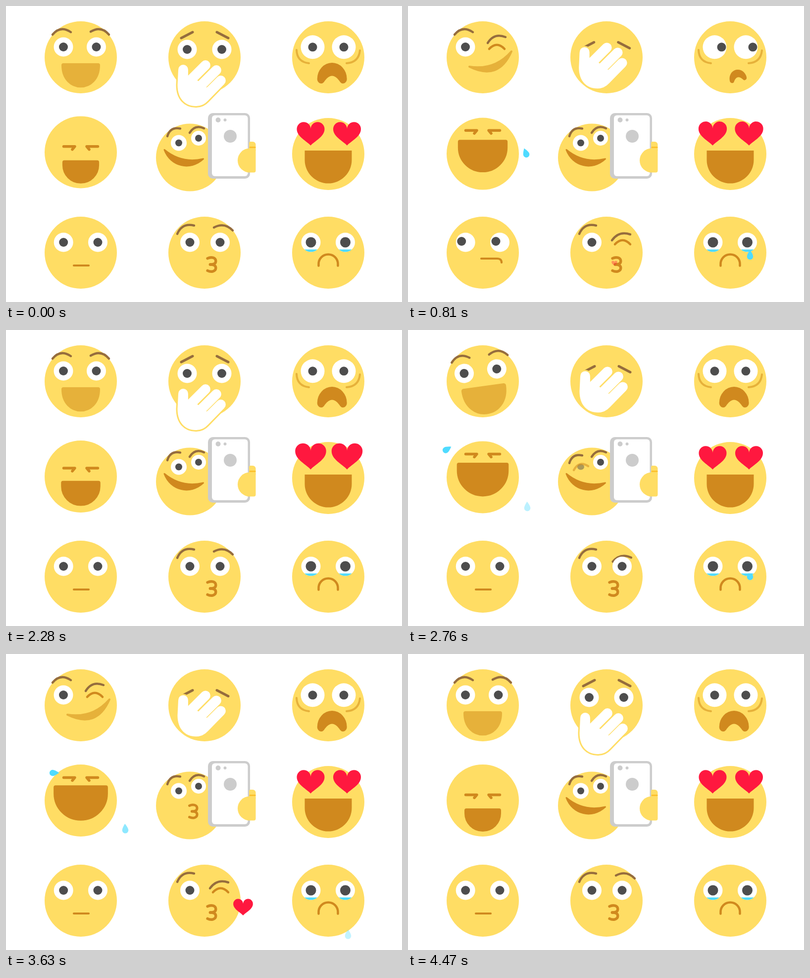
An HTML page with a canvas for the animation above (4.5 s loop, 800 by 600 pixels).

```html
<!DOCTYPE html>
<html lang="en">
<head>
<meta charset="utf-8">
<title>Emoji faces</title>
<style>
  html, body { margin: 0; overflow: hidden; background: #fff; }
  canvas { display: block; }
</style>
</head>
<body>
<canvas width="800" height="600"></canvas>
<script>
const ctx = document.querySelector('canvas').getContext('2d');
const YELLOW = '#ffdd64', BROWN = '#d0891e', GOLD = '#e6b13a', BROW = '#966d3d', RED = '#ff183f',
      DARK = '#4d4d4d', BLUE = '#4fdbff', GREY = '#ccc', ORANGE = '#fcc12f', WHITE = '#fff';
const HEART = 'M0,0C-8,-9 -28,-18 -28,-33A14,14 0 0 1 0,-34A14,14 0 0 1 28,-33C28,-18 8,-9 0,0Z';
const DROP = 'M0,-10Q6.3,-1 6.3,3.2A6.3,6.3 0 0 1 -6.3,3.2Q-6.3,-1 0,-10Z';
const LOOP = 4500, CYCLE = 2250;
let t = 0; // time within the current cycle

// Timing
const clamp = u => Math.min(1, Math.max(0, u));
const lerp = (a, b, k) => a + (b - a) * k;
const mix = (from, to, k) => from.map((v, i) => lerp(v, to[i], k));
const ramp = (a, b, time = t) => { const u = clamp((time - a) / (b - a)); return u * u * (3 - 2 * u); };
const hold = (a, b, c, d, time = t) => ramp(a, b, time) - ramp(c, d, time);
const bump = (a, b) => Math.sin(Math.PI * clamp((t - a) / (b - a))) ** 2;

// Drawing
function fill(d, color) {
  ctx.fillStyle = color;
  ctx.fill(new Path2D(d));
}
function line(d, color, width = 4.5) {
  ctx.strokeStyle = color;
  ctx.lineWidth = width;
  ctx.stroke(new Path2D(d));
}
function soft(d, color, width) {
  fill(d, color);
  line(d, color, width);
}
function circle(x, y, r, color) {
  ctx.fillStyle = color;
  ctx.beginPath();
  ctx.arc(x, y, r, 0, 7);
  ctx.fill();
}
function box(x, y, w, h, radii, color) {
  ctx.fillStyle = color;
  ctx.beginPath();
  ctx.roundRect(x, y, w, h, radii);
  ctx.fill();
}
function at(x, y, { scale = 1, scaleY = scale, turn = 0, alpha = 1 }, draw) {
  ctx.save();
  ctx.translate(x, y);
  ctx.rotate(turn);
  ctx.scale(scale, scaleY);
  ctx.globalAlpha *= clamp(alpha);
  draw();
  ctx.restore();
}

// A line between two points, bent upwards
function arch([x1, y1, x2, y2], bend, color = BROW, width = 4.5) {
  const f = bend / Math.hypot(x2 - x1, y2 - y1);
  line(`M${x1},${y1}Q${(x1 + x2) / 2 + (y2 - y1) * f},${(y1 + y2) / 2 - (x2 - x1) * f} ${x2},${y2}`, color, width);
}
// A mouth hung between two corners; splay moves the lower curve inwards
function mouth([x1, y1, x2, y2], top, depth, splay, color, width) {
  const length = Math.hypot(x2 - x1, y2 - y1), ux = (x2 - x1) / length, uy = (y2 - y1) / length;
  const point = (along, down) => [x1 + ux * along * length - uy * down, y1 + uy * along * length + ux * down];
  soft(`M${x1},${y1}Q${point(.5, top)} ${x2},${y2}C${point(1 - splay, depth)} ${point(splay, depth)} ${x1},${y1}Z`, color, width);
}
function eye(x, y, { r = 19.5, pupil = 9, dx = 0, dy = 0, shut = 0 } = {}) {
  at(x, y, { scaleY: 1 - .3 * shut, alpha: 1 - 2 * shut }, () => circle(0, 0, r, WHITE));
  at(x, y, { scaleY: 1 - .3 * shut, alpha: 1 - shut }, () => circle(dx, dy, pupil, DARK));
}
function lid(ends, shut) {
  at(0, 0, { alpha: shut }, () => arch(ends, 16.5, BROWN));
}
function lips(x, y, size, alpha = 1) {
  at(x, y, { scale: size, alpha }, () => {
    for (const scaleY of [1, -1])
      at(0, 0, { scaleY }, () => line('M-8,-11.5C-1,-15 7,-13 7.5,-7S2,0 -3,0', BROWN, 5));
  });
}

function winking() {
  circle(151, 104, 73, YELLOW);
  const tilt = bump(420, 680), wink = hold(560, 650, 1430, 1540);
  at(151, 104, { turn: -.172 * tilt }, () => {
    ctx.translate(-151, -104);
    arch([94, 58, 131, 53], 17);
    arch(mix([171, 52, 208, 58], [161, 75, 197, 63], wink), 16);
    eye(116, 83, {});
    eye(182.5, 83, { shut: wink });
    lid([164, 87, 195, 87], wink);
    at(151, 130, { scale: 1 + .21 * tilt * (1 - wink) }, () => {
      ctx.translate(-151, -130);
      const corners = mix([116, 120, 186, 120], [124, 123, 209, 92], wink);
      mouth(corners, 25 * wink, lerp(55, 32, wink), wink / 3, GOLD, 8 - 4 * wink);
    });
  });
}

function facepalm() {
  circle(401, 104, 73, YELLOW);
  const k = hold(300, 480, 2040, 2210), sway = -1.3 * bump(600, 1000);
  eye(366, 88, { shut: k });
  eye(436, 88, { shut: k });
  at(sway, 20.5 * k, {}, () => line('M354,65L377,53M426,53L449,65', BROW, 5));
  at(sway, -35.7 * k, {}, () => {
    const fingers = 'M358,129V158M403,120l-29,29M425,130l-29,29M434,151l-34,34';
    const palm = 'M348,130L346.5,160C346.5,188 362,203 384,203Q398,203 408,192L441,158L405,165L387,151L366,143Z';
    line(fingers, YELLOW, 25);
    line(palm, YELLOW, 6);
    line(fingers, WHITE, 19.8);
    fill(palm, WHITE);
  });
}

function scared() {
  circle(651, 104, 73, YELLOW);
  // 1 looks right, -1 looks left
  const look = hold(580, 680, 930, 1020) - hold(930, 1020, 1240, 1340);
  arch([587, 89, 612, 116], -16, GOLD, 4);
  arch([688, 116, 715, 90], -16, GOLD, 4);
  for (const x of [619.5, 682.5]) eye(x, 83.3, { r: 24, dx: 14 * look });
  at(658.7 + 8.3 * look, 148, { scale: 1 - .42 * Math.abs(look), turn: -.23 * look }, () =>
    fill('M-30,0A30,33 0 0 1 30,0A7.9,9 0 0 1 15,4Q0,-17 -15,4A7.9,9 0 0 1 -30,0Z', BROWN));
}

function sweat(age, side) {
  if (age < 0 || age > 320) return;
  const x = 90 - 60 * Math.exp(-age / 42);
  const y = 241 + 117 * Math.sin(clamp((age - 50) / 235) * Math.PI / 2);
  const turn = Math.PI / 2 * Math.exp(-Math.max(0, age - 20) / 70);
  at(151 + side * x, y, { turn: -side * turn, scale: clamp(age / 20), alpha: 1 - (age - 205) / 115 },
    () => fill(DROP, BLUE));
}

function laughing() {
  const open = hold(-5, 140, 1440, 1570), bounce = (1 - Math.cos(2 * Math.PI * t / 225)) / 2;
  circle(151, 296.4 + 3.5 * bounce, 73, YELLOW);
  at(151, 285 - 35 * open + 2.5 * bounce, {}, () =>
    line('M-34.5,0H-12l-5,6M34.5,0H12l5,6', BROWN, 5.5));
  const w = lerp(33, 52 - 6.5 * bounce, open), top = lerp(317, 269 + 7 * bounce, open);
  const rim = lerp(356, 334 - bounce, open) - w;
  soft(`M${151 - w},${top}h${2 * w}V${rim}A${w},${w} 0 0 1 ${151 - w},${rim}Z`, BROWN, 8);
  for (let start = 0; start < 1350; start += 450) {
    sweat(t - 460 - start, -1);
    sweat(t - 235 - start, 1);
  }
}

function selfie() {
  circle(371.5, 307, 68.5, YELLOW);
  const wink = hold(480, 540, 710, 770), kiss = hold(1130, 1210, 1850, 1930);
  at(0, 6 * ramp(0, .6, wink), {}, () => arch([326, 264, 352, 248.5], 14));
  arch([371, 257, 400, 248], 13.5);
  eye(349, 277.5, { r: 16, pupil: 7, shut: wink });
  lid([335, 284, 364, 276], wink);
  eye(389, 268, { r: 15, pupil: 7 });
  at(0, 0, { alpha: 1 - kiss }, () => mouth([320, 291.5, 398.5, 310], 20, 30, .25, BROWN, 3));
  lips(378.5 + 9.5 * hold(1400, 1520, 1700, 1830), 319, 1, kiss);

  box(408, 217, 85, 133, 10, GREY);
  box(416, 221.5, 72.5, 123.5, 6, WHITE);
  circle(428.5, 231, 5, GREY);
  circle(442.5, 231, 3, GREY);
  circle(453, 264, 13, GREY);
  at(0, 15 * hold(1440, 1500, 1650, 1730), {}, () => {
    box(491, 275, 13.5, 18, [3, 6, 0, 0], YELLOW);
    line('M493,286.5H503', ORANGE, 3);
  });
  box(468, 288.5, 36.5, 49, [24.5, 4, 4, 24.5], YELLOW);
  at(0, 0, { alpha: hold(1490, 1530, 1620, 1680) }, () =>
    line('M391.5,216.5l3.5,2.5M410,207.5l1.5,4M430.5,203l-1,4', YELLOW, 5));
}

function loving(time) {
  circle(651, 300, 73, YELLOW);
  fill('M603.5,293h95V312a47.5,47.5 0 0 1 -95,0Z', BROWN);
  const beat = time % 1500;
  const scale = 1 + .24 * (hold(225, 330, 330, 435, beat) + hold(630, 730, 730, 830, beat));
  for (const x of [615.5, 689]) at(x, 282.7, { scale }, () => fill(HEART, RED));
}

function eyeroll(time) {
  circle(151, 500, 73, YELLOW);
  const k = hold(580, 740, 1840, 2000, time);
  const angle = Math.PI * (1 + clamp((time - 850) / 947));
  const dx = 8 * Math.cos(angle) * k, dy = (12 * Math.sin(angle) - 2) * k;
  for (const x of [116.2, 185.5]) eye(x, 479, { dx, dy });
  line(`M${137 + 11 * k},${526 - 14 * k}h${23 + 9 * k}q${7 + 2 * k},0 ${7 + 2 * k},${8 * k}`, BROWN, 4.2);
}

function kissing() {
  circle(401, 500, 73, YELLOW);
  const wink = hold(530, 600, 1780, 1860);
  arch([346, 462, 380, 445], 16);
  arch(mix([420, 449, 458, 455], [412, 475, 449, 463], hold(430, 545, 1780, 1900)), 14.5);
  eye(371.5, 479, {});
  eye(432.5, 479, { shut: wink });
  lid([418, 483, 449, 483], wink);
  lips(415.7 + 6 * bump(620, 1000) - 6 * hold(1400, 1540, 1680, 1830), 524, 1.08);
  if (t > 770 && t < 1500) {
    const u = 1 - (1 - clamp((t - 790) / 400)) ** 2;
    at(410 + 69 * u, 526 + 4 * u, { scale: .15 + .56 * u, alpha: Math.min((t - 770) / 110, (1500 - t) / 100) },
      () => fill(HEART, RED));
  }
}

function crying() {
  circle(651, 500, 73, YELLOW);
  for (const x of [616, 685.5]) {
    eye(x, 479, { pupil: 10.5 });
    ctx.fillStyle = BLUE;
    ctx.beginPath();
    ctx.arc(x, 479, 19.5, .84, Math.PI - .84);
    ctx.fill();
  }
  line('M631.5,526.5V523a19.5,19.5 0 0 1 39,0V526.5', BROWN);
  if (t > 380 && t < 1430) {
    const fall = clamp((t - 1020) / 370) ** 2;
    ctx.save();
    ctx.beginPath();
    ctx.rect(660, 493.5, 60, 106.5);
    ctx.clip();
    at(691, 488 + 16.5 * ramp(380, 620) + 67 * fall, { alpha: 1 - (t - 1250) / 200 }, () => fill(DROP, BLUE));
    ctx.restore();
  }
}

function frame(now) {
  const time = now % LOOP;
  t = time % CYCLE;
  ctx.lineCap = ctx.lineJoin = 'round';
  ctx.fillStyle = WHITE;
  ctx.fillRect(0, 0, 800, 600);
  for (const face of [winking, facepalm, scared, laughing, selfie, loving, eyeroll, kissing, crying]) face(time);
  requestAnimationFrame(frame);
}
requestAnimationFrame(frame);
</script>
</body>
</html>
```
